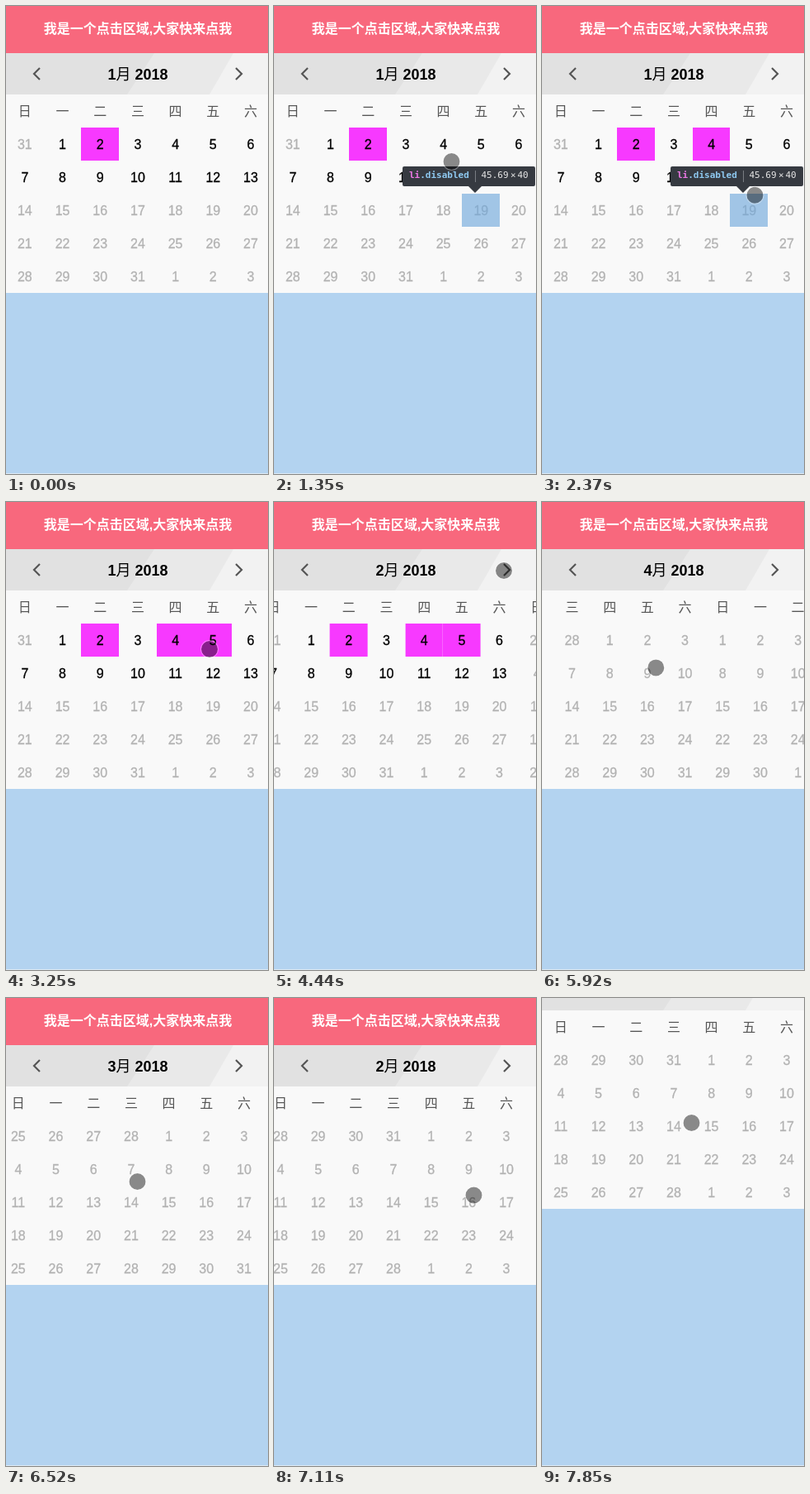
Write an HTML page that moves like this. It is 318x566 px and loops after 8 s.

```html
<!DOCTYPE html>
<html lang="zh">
<head>
<meta charset="utf-8">
<title>Calendar</title>
<style>
  html, body { margin: 0; width: 100%; height: 100%; overflow: hidden; background: #b3d3f0; }
  body { position: relative; font: 16px/40px "Liberation Sans", "Noto Sans CJK SC", "Noto Sans CJK", sans-serif; }
  body > *, .panel, .tip * { position: absolute; }
  #page { left: 0; top: 0; width: 318px; height: 347px; }
  .banner { height: 57px; line-height: 55px; background: #f8687d; color: #fff; font-weight: bold; text-align: center; padding-left: 2px; }
  .bar { position: relative; height: 50px; line-height: 53px; font-size: 18px; font-weight: bold; text-align: center; padding-left: 2px; }
  .bar svg { position: absolute; left: 0; top: 0; }
  .bar div { position: relative; }
  .bar i { font-style: normal; }
  .bar span { font-weight: normal; }
  .view { position: relative; height: 240px; overflow: hidden; background: #f9f9f9; }
  .panel { top: 0; display: grid; grid-template-columns: repeat(7, 45.69px); grid-auto-rows: 40px; line-height: 42px; text-align: center; color: #b2b2b2; }
  .panel > * { height: 40px; }
  .panel div { -webkit-text-stroke: .3px; }
  .panel b { font-weight: normal; color: #555; }
  .panel .open { color: #000; }
  .panel .on { background: #f739ff; }
  .edge { left: 0; right: 0; bottom: 0; height: 1px; background: #dce8f3; }
  .tip { left: 0; top: 0; font: bold 11px/24px "DejaVu Sans Mono", monospace; white-space: nowrap; }
  .cell { left: 228.4px; top: 227px; width: 45.69px; height: 40px; background: rgba(111, 168, 220, .63); }
  .box { left: 156px; top: 194px; width: 161px; height: 24px; border-radius: 2px; background: #363a41; color: #e6e6e6; }
  .box * { top: -1px; }
  .tip .rule { left: 88px; top: 5px; width: 1px; height: 14px; background: #797d83; }
  .size { font-weight: normal; }
  .arrow { left: 236px; top: 218px; border: solid transparent; border-width: 8px 8px 0; border-top-color: #363a41; }
  #cursor { left: -11px; top: -11px; width: 20px; height: 20px; border: 1px solid rgba(255, 255, 255, .35); border-radius: 50%; background: rgba(0, 0, 0, .45); background-clip: padding-box; }
</style>
</head>
<body>
<div id="page">
  <div class="banner">我是一个点击区域,大家快来点我</div>
  <div class="bar">
    <svg width="318" height="50">
      <path fill="#e1e1e1" d="M0 0H318V50H0z"/>
      <path fill="#e9e9e9" d="M180 0H318V50H147z"/>
      <path fill="#f2f2f2" d="M276 0H318V50H247z"/>
      <path fill="none" stroke="#555" stroke-width="2.2" d="M41 18l-7 7 7 7M279 18l7 7-7 7"/>
    </svg>
    <div><i id="month">1</i><span>月</span> 2018</div>
  </div>
  <div class="view" id="view"></div>
</div>
<div class="edge"></div>
<div class="tip" id="tip">
  <div class="cell"></div>
  <div class="box">
    <span style="left:8px;color:#ee78e6">li</span>
    <span style="left:21.2px;color:#8fcaf2">.disabled</span>
    <i class="rule"></i>
    <span class="size" style="left:95.5px">45.69</span>
    <span class="size" style="left:131px">×</span>
    <span class="size" style="left:139.5px">40</span>
  </div>
  <i class="arrow"></i>
</div>
<div id="cursor"></div>
<script>
const $ = id => document.getElementById(id);
const LOOP = 8000, TICK = 148, LAST_TICK = 53;
const PANEL = 45.69 * 7, SLIDE_MS = 400, REACH_MS = 570;
const TIP_ON = 592, TIP_OFF = 2960, SCROLL_AT = 7400, SCROLL_BY = 92;

// Places the pointer reaches, and when.
const stops = [
  { at: 592, x: 250, y: 245 },
  { at: 1332, x: 215.5, y: 188 },
  { at: 1776, x: 206, y: 183 },
  { at: 2516, x: 269, y: 238 },
  { at: 3108, x: 247, y: 178 },
  { at: 4144, x: 279, y: 83 },
  { at: 6068, x: 110, y: 224 },
  { at: 6512, x: 159.5, y: 222 },
  { at: 7104, x: 242.5, y: 238.5 },
  { at: SCROLL_AT, x: 181.5, y: 243 }
];
const turns = [
  { at: 0, month: 0 },
  { at: 4430, month: 1 },
  { at: 4870, month: 2 },
  { at: 5860, month: 3 },
  { at: 6229, month: 2 },
  { at: 6848, month: 1 }
];
const pickedAt = { 2: 0, 4: 1924, 5: 3108 };

const clamp = v => Math.min(1, Math.max(0, v));
const smooth = v => v * v * (3 - 2 * v);
const easeOut = v => 1 - (1 - v) ** 3;
const mix = (a, b, p) => a + (b - a) * p;
const lastIndex = (list, t) => list.findLastIndex(item => item.at <= t);

function pointerAt(t) {
  const i = lastIndex(stops, t);
  const a = stops[i], b = stops[i + 1] || a;
  const span = Math.min(REACH_MS, b.at - a.at) || 1;
  const p = smooth(clamp(1 - (b.at - t) / span));
  return [mix(a.x, b.x, p), mix(a.y, b.y, p)];
}

function addCell(panel, tag, text) {
  const cell = document.createElement(tag);
  cell.textContent = text;
  panel.append(cell);
  return cell;
}

const days = {};
const panels = [0, 1, 2, 3].map(month => {
  const panel = document.createElement('div');
  panel.className = 'panel';
  for (const name of '日一二三四五六') addCell(panel, 'b', name);
  const lead = new Date(2018, month, 1).getDay();
  for (let i = 0; i < 35; i++) {
    const date = new Date(2018, month, 1 - lead + i);
    const day = date.getDate();
    const cell = addCell(panel, 'div', day);
    if (month === 0 && date.getMonth() === 0 && day <= 13) {
      cell.className = 'open';
      days[day] = cell;
    }
  }
  $('view').append(panel);
  return panel;
});

function render(t) {
  const i = lastIndex(turns, t);
  const turn = turns[i], before = turns[i - 1] || turn;
  const pos = mix(before.month, turn.month, easeOut(clamp((t - turn.at) / SLIDE_MS)));
  panels.forEach((panel, n) => panel.style.transform = `translateX(${(n - pos) * PANEL}px)`);
  $('month').textContent = turn.month + 1;

  // The last drag pulls the whole page along with the pointer.
  const drag = SCROLL_BY * smooth(clamp((t - SCROLL_AT) / (LAST_TICK * TICK - SCROLL_AT)));
  $('page').style.transform = `translateY(${-drag}px)`;

  for (const day in pickedAt) days[day].classList.toggle('on', t >= pickedAt[day]);
  $('tip').hidden = t < TIP_ON || t >= TIP_OFF;
  $('cursor').hidden = t < TIP_ON;
  if (t >= TIP_ON) {
    const [x, y] = pointerAt(t);
    $('cursor').style.transform = `translate(${x}px, ${y - drag}px)`;
  }
}

const start = performance.now();
function frame() {
  const t = (performance.now() - start) % LOOP;
  render(TICK * Math.min(LAST_TICK, Math.floor(t / TICK)));
  requestAnimationFrame(frame);
}
frame();
</script>
</body>
</html>
```
